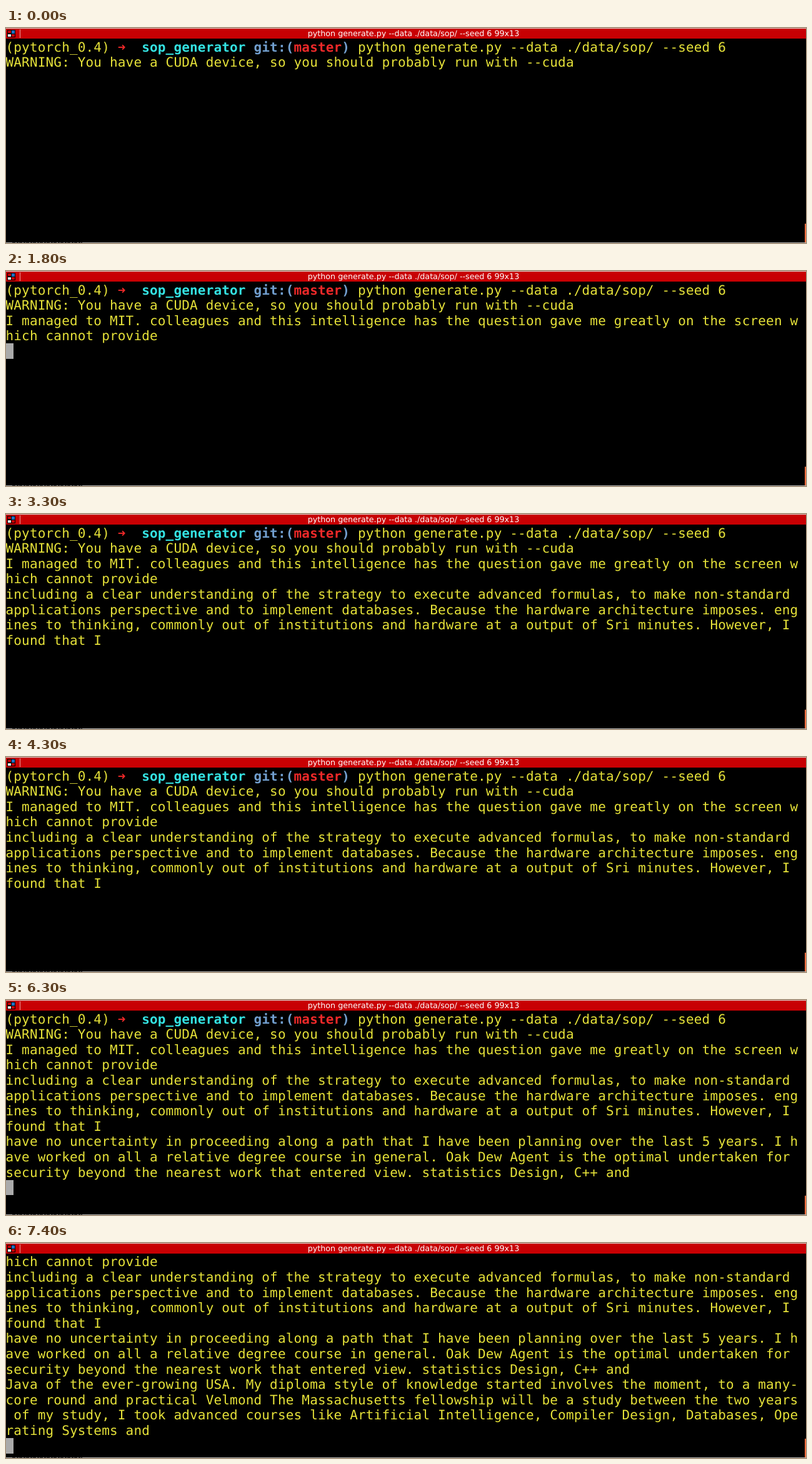
An HTML page for the animation above (8000 ms loop, 1280x345 px).

```html
<!DOCTYPE html>
<html lang="en">
<head>
<meta charset="utf-8">
<title>Terminal</title>
<style>
  html, body { margin: 0; width: 100%; height: 100%; overflow: hidden; background: #000; }
  svg { display: block; width: 1280px; height: 345px; }
  text { white-space: pre; text-rendering: geometricPrecision; }
  #rows { font: 21px "DejaVu Sans Mono", monospace; letter-spacing: .163px; fill: #e6e239; }
  #title { font: 12.7px "DejaVu Sans", sans-serif; fill: #fff; text-anchor: middle; }
  .cyan, .blue, .red { font-weight: bold; }
  .cyan { fill: #34e2e2; }
  .blue { fill: #729fcf; }
  .red { fill: #ef2929; }
</style>
</head>
<body>
<svg viewBox="0 0 1280 345">
  <rect width="1280" height="345"/>
  <g id="rows"></g>
  <rect id="cursor" width="12" height="24.6" fill="#aaa" shape-rendering="crispEdges"/>

  <g shape-rendering="crispEdges">
    <rect width="1280" height="17" fill="#c80003"/>
    <rect width="1280" height="1" fill="#ddd5d0"/>
    <rect x="22" y="2" width="1" height="14" fill="#e9a5a0"/>
    <rect x="2" y="3" width="13" height="12"/>
    <rect x="3" y="4" width="5" height="4" fill="#c80003"/>
    <rect x="9" y="4" width="5" height="5" fill="#1c6fc0"/>
    <rect x="3" y="10" width="5" height="4" fill="#e6e6e6"/>
    <rect x="9" y="10" width="5" height="4" fill="#c80003"/>
    <rect x="1278" y="314" width="2" height="30" fill="#ee6a3c"/>
    <rect y="344" width="1280" height="1" fill="#b5b3b0"/>
    <path d="M10 344.5H122" stroke="#444" stroke-dasharray="5 2 3 1"/>
  </g>
  <text id="title" x="652" y="13">python generate.py --data ./data/sop/ --seed 6 99x13</text>
</svg>
<script>
const LOOP = 8000, LEFT = -0.5, TOP = 18, COL = 12.806, ROW = 24.6, BASE = 19.5;
const VISIBLE = 13;

// [column, text, colour]
const prompt = [
  [0, "(pytorch_0.4)", ""],
  [14, "➜", "red"],
  [17, "sop_generator", "cyan"],
  [31, "git:(", "blue"],
  [36, "master", "red"],
  [42, ")", "blue"],
  [44, "python generate.py --data ./data/sop/ --seed 6", ""]
];

const output = [
  "WARNING: You have a CUDA device, so you should probably run with --cuda",
  "I managed to MIT. colleagues and this intelligence has the question gave me greatly on the screen w",
  "hich cannot provide",
  "including a clear understanding of the strategy to execute advanced formulas, to make non-standard",
  "applications perspective and to implement databases. Because the hardware architecture imposes. eng",
  "ines to thinking, commonly out of institutions and hardware at a output of Sri minutes. However, I",
  "found that I",
  "have no uncertainty in proceeding along a path that I have been planning over the last 5 years. I h",
  "ave worked on all a relative degree course in general. Oak Dew Agent is the optimal undertaken for",
  "security beyond the nearest work that entered view. statistics Design, C++ and",
  "Java of the ever-growing USA. My diploma style of knowledge started involves the moment, to a many-",
  "core round and practical Velmond The Massachusetts fellowship will be a study between the two years",
  " of my study, I took advanced courses like Artificial Intelligence, Compiler Design, Databases, Ope",
  "rating Systems and"
];
const lines = [prompt, ...output.map(s => [[0, s, ""]])];

// [start ms, printed lines, cursor shown]
const steps = [
  [0, 2, 0], [300, 2, 1], [800, 2, 0], [1400, 2, 1],
  [1800, 4, 1], [2000, 4, 0], [2600, 4, 1], [3200, 4, 0],
  [3300, 8, 0], [3700, 8, 1], [4300, 8, 0],
  [5000, 11, 1], [5600, 11, 0], [6300, 11, 1],
  [6400, 15, 1], [6700, 15, 0], [7400, 15, 1]
];

const rows = document.getElementById("rows");
const cursor = document.getElementById("cursor");

rows.innerHTML = lines.map((line, i) => {
  const spans = line.map(([col, s, colour]) =>
    `<tspan x="${LEFT + col * COL}" class="${colour}">${s}</tspan>`).join("");
  return `<text y="${TOP + BASE + i * ROW}">${spans}</text>`;
}).join("");

function show([, count, blink]) {
  const scroll = Math.max(0, count + 1 - VISIBLE);
  [...rows.children].forEach((el, i) => {
    el.style.display = i >= scroll && i < count ? "" : "none";
  });
  rows.setAttribute("transform", `translate(0 ${-scroll * ROW})`);
  cursor.setAttribute("y", TOP + (count - scroll) * ROW);
  cursor.style.display = blink ? "" : "none";
}

let current;
const start = performance.now();
function tick() {
  const t = (performance.now() - start) % LOOP;
  const step = steps.findLast(s => s[0] <= t);
  if (step !== current) show(current = step);
  requestAnimationFrame(tick);
}
tick();
</script>
</body>
</html>
```
